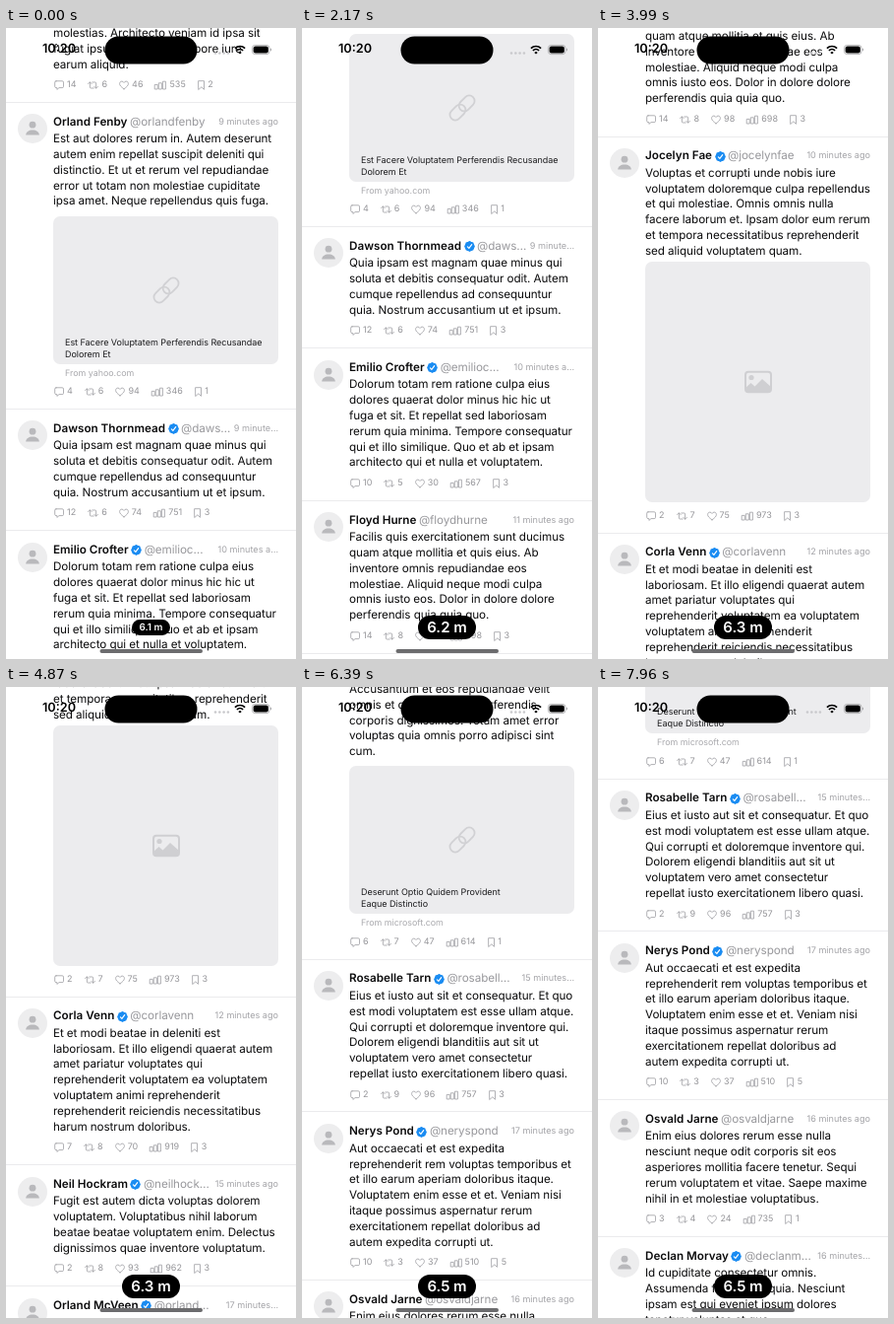
These frames come from a looping animation (295x640 px, 8000 ms). An HTML page:

```html
<!DOCTYPE html>
<html lang="en">
<head>
<meta charset="utf-8">
<title>Feed scroll</title>
<style>
html, body { margin: 0; width: 100%; height: 100%; overflow: hidden; background: #fff; }
body {
  position: relative; color: #0b0b0c; white-space: pre;
  font: 400 11.7px/15.82px Inter, "Liberation Sans", sans-serif;
  text-rendering: geometricPrecision;
}
svg { display: block; overflow: visible; flex: none; }
#feed { position: absolute; left: 0; top: -64px; width: 295px; will-change: transform; }
.post { position: relative; padding: 29.6px 18px 3.5px 48px; }
.post::before { content: ""; position: absolute; left: 0; right: 0; top: 0; height: 1px; background: #ebebed; }
.avatar { position: absolute; left: 12px; top: 12.5px; }
.head { position: absolute; left: 48px; right: 18px; top: 12.7px; height: 16px; display: flex; align-items: center; gap: 2.5px; }
.head b { font-weight: 600; }
.handle { color: #98989c; letter-spacing: -.09px; }
.when { margin-left: auto; font-size: 9.1px; color: #a4a4a8; }
.body { position: relative; top: .7px; letter-spacing: -.09px; }
.card { position: relative; border-radius: 7px; background: #ececee; }
.card svg { position: absolute; left: 50%; top: 50%; }
.photo { margin-top: 3.2px; height: 244px; }
.link { margin-top: 7px; height: 150px; }
.link p { position: absolute; left: 12px; top: 123px; margin: 0; font-size: 9px; line-height: 12px; letter-spacing: -.03px; color: #1c1c1e; }
.from { height: 15px; padding-left: 12px; font-size: 8.9px; line-height: 19px; color: #a9a9ad; }
.stats { display: flex; align-items: center; gap: 12px; height: 26.8px; padding-left: 1px; font-size: 9px; color: #96969a; }
.stats span { display: flex; align-items: center; gap: 3px; }
.stats svg { fill: none; stroke: #a3a3a8; stroke-width: .85; stroke-linejoin: round; stroke-linecap: round; }
#clock { position: absolute; left: 37px; top: 14px; font-size: 12.7px; font-weight: 600; line-height: 16px; color: #000; }
#chrome { position: absolute; left: 0; top: 0; }
#meter {
  position: absolute; left: 118px; top: 595.5px; width: 59px; height: 24px; border-radius: 12px;
  background: #000; color: #fff; font-size: 15px; font-weight: 600; line-height: 24px; text-align: center;
}
</style>
</head>
<body>
<div id="feed"></div>
<div id="clock">10:20</div>
<svg id="chrome" width="295" height="640">
  <rect x="100.5" y="8.5" width="94" height="28" rx="14"/>
  <g fill="#c9c9cc">
    <circle cx="213" cy="25.5" r="1.3"/><circle cx="217.3" cy="25.5" r="1.3"/>
    <circle cx="221.6" cy="25.5" r="1.3"/><circle cx="225.9" cy="25.5" r="1.3"/>
  </g>
  <g transform="translate(232 17)">
    <path d="M.9 3.6a7.2 7.2 0 0 1 10.2 0M2.9 5.9a4.4 4.4 0 0 1 6.2 0" fill="none" stroke="#000" stroke-width="1.7"/>
    <path d="M6 9.6 4.3 7.9a2.4 2.4 0 0 1 3.4 0z"/>
  </g>
  <rect x="250.4" y="17.4" width="17.6" height="9.2" rx="3" fill="none" stroke="#a5a5a8" stroke-width=".8"/>
  <rect x="251.6" y="18.6" width="15.2" height="6.8" rx="2"/>
  <path d="M269 20.5a1.6 1.6 0 0 1 0 3z" fill="#a5a5a8"/>
  <rect x="95.5" y="630" width="104.5" height="4" rx="2" fill="#6c6c6e"/>
</svg>
<div id="meter"></div>
<script>
const ICONS = [
  [10, 'M2 .8h6.2a1.3 1.3 0 0 1 1.3 1.3v4.2a1.3 1.3 0 0 1-1.3 1.3H5L2.9 9.4V7.6H2A1.3 1.3 0 0 1 .7 6.3V2.1A1.3 1.3 0 0 1 2 .8z'],
  [11, 'M.6 3.6 2.4 1.8l1.8 1.8M2.4 2v5a1 1 0 0 0 1 1h2.8M10.4 6.4 8.6 8.2 6.8 6.4M8.6 8V3a1 1 0 0 0-1-1H4.8'],
  [10, 'M5 8.8C2 6.8.6 5.2.6 3.5.6 2.1 1.6 1.1 2.8 1.1c1 0 1.7.5 2.2 1.4.5-.9 1.2-1.4 2.2-1.4 1.2 0 2.2 1 2.2 2.4C9.4 5.2 8 6.8 5 8.8z'],
  [12, 'M.6 4.4h2.6V9H.6zM4.7 2.8h2.6V9H4.7zM8.8 1.2h2.6V9H8.8z'],
  [7.5, 'M1 .7h5.5v8.6L3.75 6.9 1 9.3z']
];
const AVATAR = `<svg class="avatar" width="30" height="30"><circle cx="15" cy="15" r="15" fill="#ededee"/>
<g fill="#b9b9bc"><circle cx="15" cy="11.2" r="3.4"/><path d="M8.2 21.4c0-3 3-5 6.8-5s6.8 2 6.8 5z"/></g></svg>`;
const SEAL = `<svg width="11" height="11"><g fill="#1a8cf2"><rect x="1.1" y="1.1" width="8.8" height="8.8" rx="2.3"/>
<rect x="1.1" y="1.1" width="8.8" height="8.8" rx="2.3" transform="rotate(45 5.5 5.5)"/></g>
<path d="M3.4 5.8 4.9 7.3 7.7 3.7" fill="none" stroke="#fff" stroke-width="1.2" stroke-linecap="round"/></svg>`;
const CHAIN = `<svg width="1" height="1"><g transform="rotate(-45)" fill="none" stroke="#d1d1d4" stroke-width="1.8">
<rect x="-15.5" y="-5.5" width="18" height="11" rx="5.5"/><rect x="-2.5" y="-5.5" width="18" height="11" rx="5.5"/></g></svg>`;
const PICTURE = `<svg width="1" height="1"><rect x="-13" y="-10.2" width="26" height="20.4" rx="3" fill="none" stroke="#cfcfd2" stroke-width="2"/>
<g fill="#cfcfd2"><circle cx="-7" cy="-4.5" r="2.6"/><path d="M-13 10V6l5.5-5 4 3.5L4-3l9 8v5z"/></g></svg>`;

const photo = () => `<div class="card photo">${PICTURE}</div>`;
const link = (title, site) => `<div class="card link">${CHAIN}<p>${title}</p></div><div class="from">From ${site}</div>`;

// name, verified, handle, age, stats, text, media
const POSTS = [
  ['Pelham Orrick', 0, '@pelhamorrick', '9 minutes ago', '14 6 46 535 2',
`Aut quia voluptas et rerum
dolorem sit enim et
molestias. Architecto veniam id ipsa sit
fugiat ipsum voluptatem labore iure
earum aliquid.`],
  ['Orland Fenby', 0, '@orlandfenby', '9 minutes ago', '4 6 94 346 1',
`Est aut dolores rerum in. Autem deserunt
autem enim repellat suscipit deleniti qui
distinctio. Et ut et rerum vel repudiandae
error ut totam non molestiae cupiditate
ipsa amet. Neque repellendus quis fuga.`,
    link('Est Facere Voluptatem Perferendis Recusandae\nDolorem Et', 'yahoo.com')],
  ['Dawson Thornmead', 1, '@daws…', '9 minute…', '12 6 74 751 3',
`Quia ipsam est magnam quae minus qui
soluta et debitis consequatur odit. Autem
cumque repellendus ad consequuntur
quia. Nostrum accusantium ut et ipsum.`],
  ['Emilio Crofter', 1, '@emilioc…', '10 minutes a…', '10 5 30 567 3',
`Dolorum totam rem ratione culpa eius
dolores quaerat dolor minus hic hic ut
fuga et sit. Et repellat sed laboriosam
rerum quia minima. Tempore consequatur
qui et illo similique. Quo et ab et ipsam
architecto qui et nulla et voluptatem.`],
  ['Floyd Hurne', 0, '@floydhurne', '11 minutes ago', '14 8 98 698 3',
`Facilis quis exercitationem sunt ducimus
quam atque mollitia et quis eius. Ab
inventore omnis repudiandae eos
molestiae. Aliquid neque modi culpa
omnis iusto eos. Dolor in dolore dolore
perferendis quia quia quo.`],
  ['Jocelyn Fae', 1, '@jocelynfae', '10 minutes ago', '2 7 75 973 3',
`Voluptas et corrupti unde nobis iure
voluptatem doloremque culpa repellendus
et qui molestiae. Omnis omnis nulla
facere laborum et. Ipsam dolor eum rerum
et tempora necessitatibus reprehenderit
sed aliquid voluptatem quam.`, photo()],
  ['Corla Venn', 1, '@corlavenn', '12 minutes ago', '7 8 70 919 3',
`Et et modi beatae in deleniti est
laboriosam. Et illo eligendi quaerat autem
amet pariatur voluptates qui
reprehenderit voluptatem ea voluptatem
voluptatem animi reprehenderit
reprehenderit reiciendis necessitatibus
harum nostrum doloribus.`],
  ['Neil Hockram', 1, '@neilhock…', '15 minutes ago', '2 8 93 962 3',
`Fugit est autem dicta voluptas dolorem
voluptatem. Voluptatibus nihil laborum
beatae beatae voluptatem enim. Delectus
dignissimos quae inventore voluptatum.`],
  ['Orland McVeen', 1, '@orland…', '17 minutes…', '6 7 47 614 1',
`Consequatur reiciendis sunt recusandae
quaerat consequatur voluptate distinctio
perferendis officia iure ex aut.
Accusantium et eos repudiandae velit
omnis et consequuntur perferendis
corporis dignissimos. Totam amet error
voluptas quia omnis porro adipisci sint
cum.`,
    link('Deserunt Optio Quidem Provident\nEaque Distinctio', 'microsoft.com')],
  ['Rosabelle Tarn', 1, '@rosabell…', '15 minutes…', '2 9 96 757 3',
`Eius et iusto aut sit et consequatur. Et quo
est modi voluptatem est esse ullam atque.
Qui corrupti et doloremque inventore qui.
Dolorem eligendi blanditiis aut sit ut
voluptatem vero amet consectetur
repellat iusto exercitationem libero quasi.`],
  ['Nerys Pond', 1, '@neryspond', '17 minutes ago', '10 3 37 510 5',
`Aut occaecati et est expedita
reprehenderit rem voluptas temporibus et
et illo earum aperiam doloribus itaque.
Voluptatem enim esse et et. Veniam nisi
itaque possimus aspernatur rerum
exercitationem repellat doloribus ad
autem expedita corrupti ut.`],
  ['Osvald Jarne', 0, '@osvaldjarne', '16 minutes ago', '3 4 24 735 1',
`Enim eius dolores rerum esse nulla
nesciunt neque odit corporis sit eos
asperiores mollitia facere tenetur. Sequi
rerum voluptatem et vitae. Saepe maxime
nihil in et molestiae voluptatibus.`],
  ['Declan Morvay', 1, '@declanm…', '16 minutes…', '5 6 41 628 2',
`Id cupiditate consectetur omnis.
Assumenda facere aut quia. Nesciunt
ipsam est qui eveniet ipsum dolores
tenetur voluptas et quo.`]
];

const stat = (n, i) =>
  `<span><svg width="${ICONS[i][0]}" height="10"><path d="${ICONS[i][1]}"/></svg>${n}</span>`;

const post = ([name, verified, handle, age, stats, text, media = '']) =>
  `<div class="post">${AVATAR}<div class="head"><b>${name}</b>${verified ? SEAL : ''}` +
  `<span class="handle">${handle}</span><span class="when">${age}</span></div>` +
  `<div class="body">${text}</div>${media}<div class="stats">${stats.split(' ').map(stat).join('')}</div></div>`;

const feed = document.getElementById('feed');
const meter = document.getElementById('meter');
feed.innerHTML = POSTS.map(post).join('');

const LOOP = 8000, START = 1340;

// The screen refreshes in bursts: first time, last time, number of updates.
const TICKS = [
  [1400, 1400, 1], [1550, 2170, 7], [2280, 2600, 4], [2740, 2940, 3], [3050, 3270, 3],
  [3420, 3420, 1], [3570, 3990, 5], [4130, 4870, 8], [4970, 5210, 3], [5420, 5850, 5],
  [5990, 6730, 8], [6830, 6940, 2], [7040, 7540, 6], [7640, 7960, 4]
].flatMap(([a, b, n]) => Array.from({ length: n }, (_, i) => n > 1 ? a + (b - a) * i / (n - 1) : a));

// time, offset, speed
const PATH = [[START, 0, .1], [2170, 185, .28], [2940, 407, .28], [3990, 709, .42], [5850, 1332, .869]];

function scrollAt(t) {
  if (t <= START) return 0;
  const [t1, y1, v1] = PATH[PATH.length - 1];
  if (t >= t1) return y1 + v1 * 525 * (1 - Math.exp((t1 - t) / 525));
  const i = PATH.findIndex(p => p[0] > t);
  const [ta, ya, va] = PATH[i - 1], [tb, yb, vb] = PATH[i];
  const d = tb - ta, u = (t - ta) / d, w = 1 - u;
  return ya * w * w * (1 + 2 * u) + yb * u * u * (3 - 2 * u) + d * u * w * (va * w - vb * u);
}

function draw() {
  const now = performance.now() % LOOP;
  const t = TICKS.reduce((last, tick) => tick <= now ? tick : last, 0);
  const y = scrollAt(t);
  const grow = 1 - Math.pow(1 - Math.min(1, Math.max(0, (t - START) / 350)), 3);
  feed.style.transform = `translateY(${-Math.round(y)}px)`;
  meter.style.transform = `scale(${.66 + .34 * grow})`;
  meter.textContent = (6.13 + y / 4530).toFixed(1) + ' m';
  requestAnimationFrame(draw);
}
draw();
</script>
</body>
</html>
```
